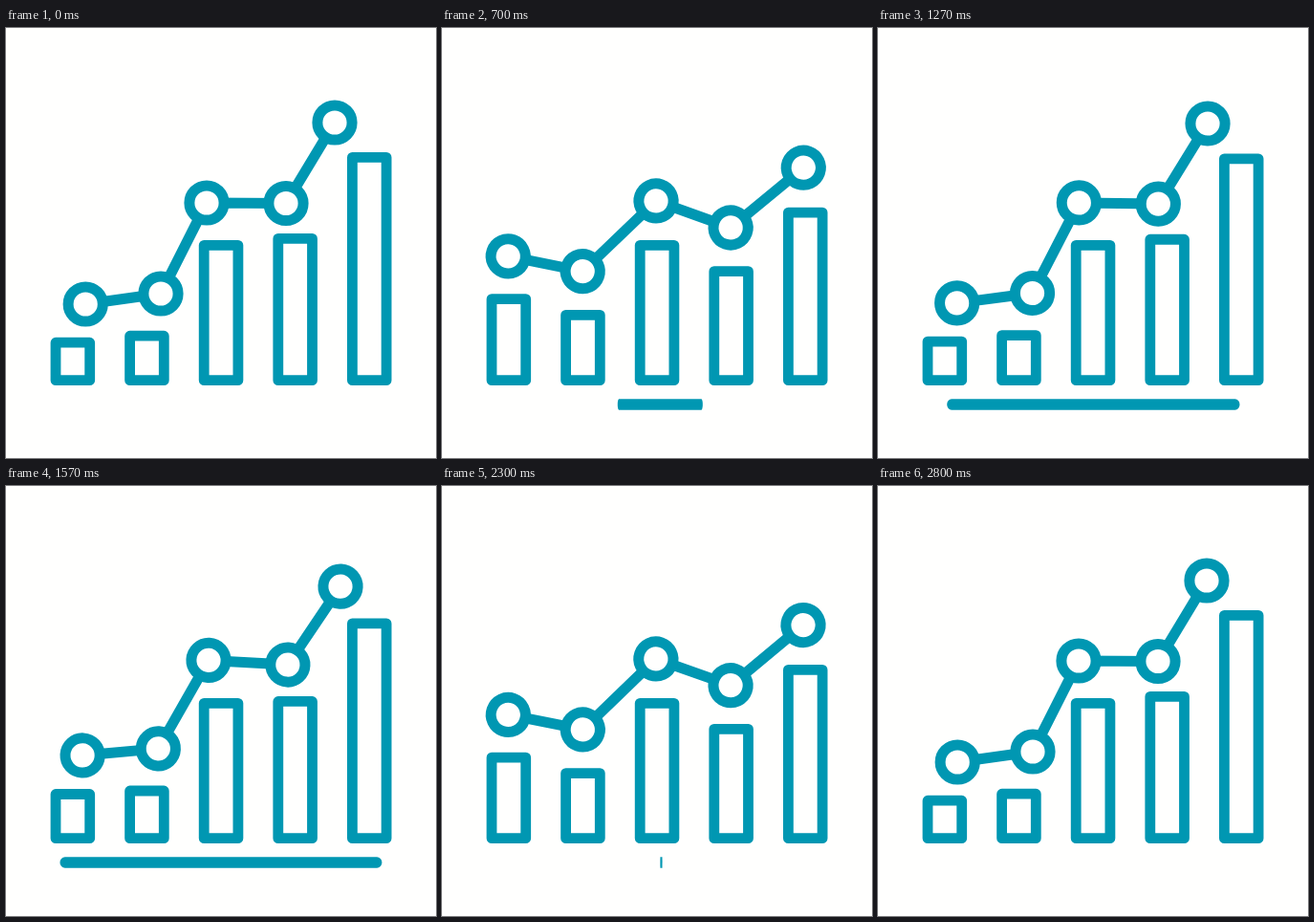
Recreate the animation shown at these times as an HTML page. Size 450 px wide and 450 px high, loop 2880 ms.

```html
<!DOCTYPE html>
<html lang="en">
<head>
<meta charset="utf-8">
<title>Chart icon</title>
<style>
  html, body { margin: 0; width: 100%; height: 100%; overflow: hidden; background: #fffffe; }
  svg { display: block; width: 100%; height: 100%; }
</style>
</head>
<body>
<svg viewBox="0 0 450 450" fill="#fffffe" stroke="#0097b2" stroke-linejoin="round">
  <g id="bars" stroke-width="10.8"></g>
  <g id="graph" stroke-width="11">
    <polyline points="83.2,289 162,278 210,183 293,183.5 344,99" fill="none"/>
  </g>
  <rect id="base" x="40" y="388.2" width="369" height="11.6" rx="5.8" fill="#0097b2" stroke="none"/>
</svg>
<script>
const LOOP = 2880, FPS = 30, LAST = 84;
const TILT = 19.5, PIVOT = "223 223", BASE_X = 229.5, BOTTOM = 368.7;
// resting top of each bar and how far it travels
const BARS = [[329.2, -45.8], [322.2, -22], [227.3, 0], [220.4, 34.5], [135.4, 58]];
// frame and value of the swing's turning points
const SWING = [[0, 0], [20, 1], [40, 0], [68, 1], [80, 0]];

const $ = id => document.getElementById(id);
const add = (parent, tag, attrs) => {
  const el = document.createElementNS("http://www.w3.org/2000/svg", tag);
  for (const k in attrs) el.setAttribute(k, attrs[k]);
  return parent.appendChild(el);
};
const clamp = x => Math.min(1, Math.max(0, x));
const ease = x => (1 - Math.cos(Math.PI * clamp(x))) / 2;

const bars = BARS.map((_, i) => add($("bars"), "rect", { x: 52 + 77.6 * i, width: 35.7 }));
for (const { x, y } of [...document.querySelector("polyline").points])
  add($("graph"), "circle", { cx: x, cy: y, r: 18.1 });

function swing(f) {
  for (let i = 1; i < SWING.length; i++) {
    const [f0, a] = SWING[i - 1], [f1, b] = SWING[i];
    if (f <= f1) return a + (b - a) * ease((f - f0) / (f1 - f0));
  }
  return 0;
}

function baseScale(f) {
  return f < 42 ? clamp((f - 7.7) / 34.3) ** 1.5 : 1 - ease((f - 41.5) / 28.9);
}

function draw(now) {
  const f = Math.min(LAST, Math.floor((now % LOOP + 5) * FPS / 1000));
  const p = swing(f);
  bars.forEach((bar, i) => {
    const top = BARS[i][0] + BARS[i][1] * p;
    bar.setAttribute("y", top);
    bar.setAttribute("height", BOTTOM - top);
  });
  $("graph").setAttribute("transform", `rotate(${TILT * p} ${PIVOT})`);
  const s = baseScale(f);
  $("base").setAttribute("transform", `translate(${BASE_X * (1 - s)} 0) scale(${s} 1)`);
}

const start = performance.now();
function tick() {
  draw(performance.now() - start);
  requestAnimationFrame(tick);
}
tick();
</script>
</body>
</html>
```
